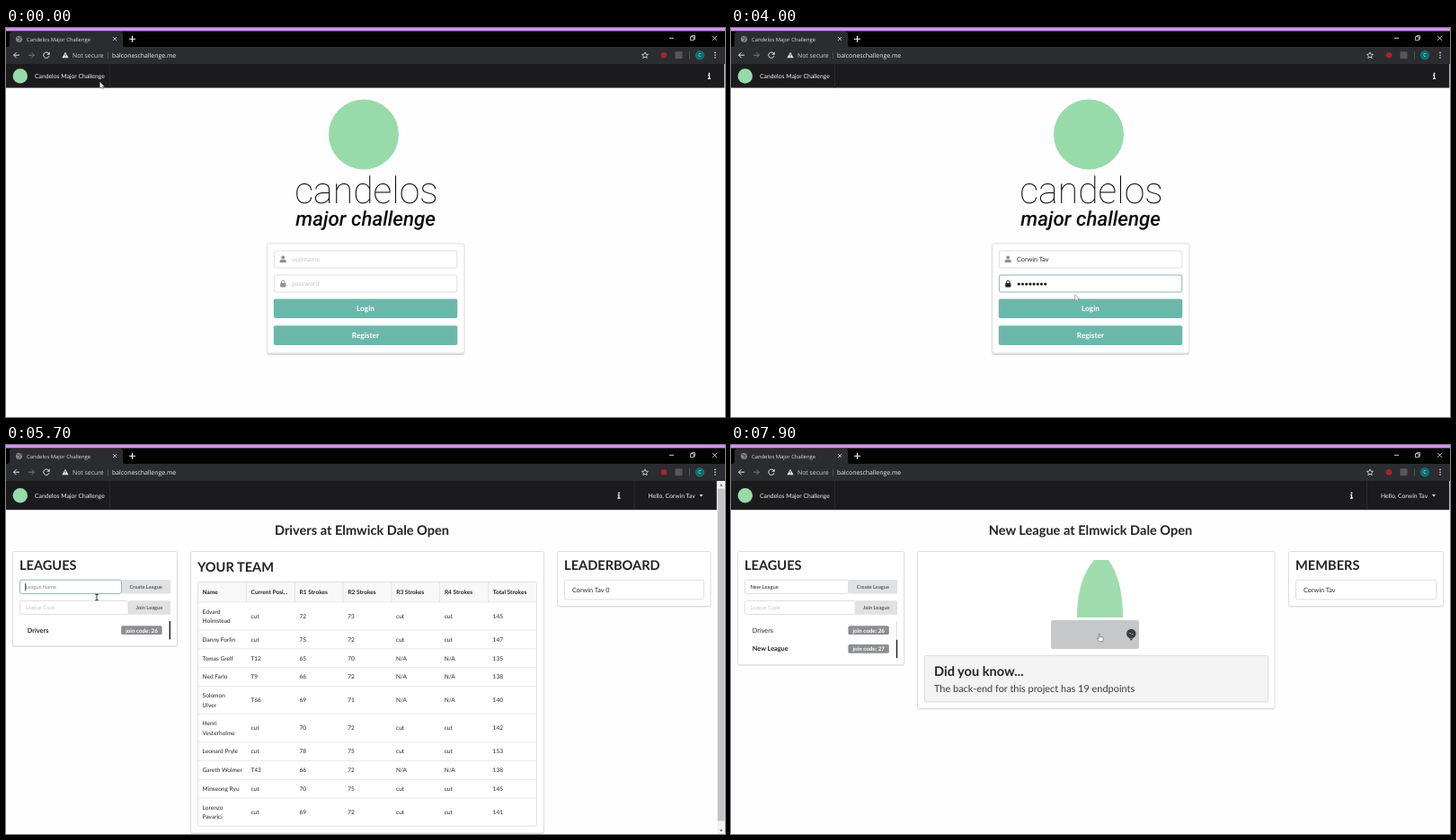
These frames come from a looping animation (800 by 433 pixels, 8000 ms). An HTML page:

```html
<!DOCTYPE html>
<html lang="en">
<head>
<meta charset="utf-8">
<title>Candelos Major Challenge</title>
<style>
  html, body { margin: 0; width: 100%; height: 100%; overflow: hidden; background: #fefdff; }
  svg { display: block; width: 800px; height: 433px; }
  text { font-family: Lato, sans-serif; white-space: pre; text-rendering: geometricPrecision; }
  .ui text { font-family: "Open Sans", "Noto Sans", sans-serif; }
  text.logo { font-family: Roboto, sans-serif; }
</style>
</head>
<body>
<svg id="stage" viewBox="0 0 800 433" xmlns="http://www.w3.org/2000/svg"></svg>
<script>
const LOOP = 8000, STEP = 100;
const APP = 'Candelos Major Challenge', USER = 'Corwin Tav';
const TEAM = 'Drivers', EVENT = 'Elmwick Dale Open', LEAGUE = 'New League';
const INK = '#222324', LINE = '#d9dadc', FOCUS = '#82acb1', TEAL = '#6bb8aa', GREEN = '#97dbaa', HINT = '#c6c6c9';

// Drawing helpers
const text = (x, y, s, size = 7.29, o = {}) =>
  `<text x="${x}" y="${y}" font-size="${size}" fill="${o.fill || INK}" font-weight="${o.bold ? 700 : o.weight || 400}"` +
  ` text-anchor="${o.mid ? 'middle' : 'start'}" ${o.more || ''}>${s}</text>`;
const rect = (x, y, w, h, fill, r = 0, more = '') =>
  `<rect x="${x}" y="${y}" width="${w}" height="${h}" rx="${r}" fill="${fill}" ${more}/>`;
const box = (x, y, w, h, more = '', fill = '#fff') => rect(x, y, w, h, fill, 2, `stroke="${LINE}" stroke-width=".9" ${more}`);
const path = (d, stroke, w = 1, fill = 'none') =>
  `<path d="${d}" fill="${fill}" stroke="${stroke}" stroke-width="${w}"/>`;
const dot = (x, y, r, fill) => `<circle cx="${x}" cy="${y}" r="${r}" fill="${fill}"/>`;
const group = (id, s, more = '') => `<g id="${id}" ${more}>${s}</g>`;
const card = (x, y, w, h) => rect(x, y + 1, w, h, '#e3e3e6', 2) + box(x, y, w, h);

function browser() {
  const lit = '#e4e5e7', dim = '#77797c';
  return group('browser',
    rect(0, 0, 800, 40, '#020203') + rect(0, 0, 800, 3.4, '#d294e9') +
    rect(0, 21, 800, 19, '#2b2c2f') +
    `<path d="M2 21Q4 21 4 18V7Q4 4 7 4H127Q130 4 130 7V18Q130 21 132 21Z" fill="#2b2c2f"/>` +
    dot(14.5, 12.3, 3.6, '#85878a') + path('M12 10.5l3 1 .5 2-2 2M15.5 9l2 3', '#3c3e41', .9) +
    text(23, 14.5, APP, 5.85, { fill: '#dfe0e2' }) +
    path('M119 10l4 4m0-4l-4 4', '#d5d6d8', .8) +
    path('M137 12.2h7M140.5 8.7v7', '#fff', 1.1) +
    path('M738 11.3h5M786 8.8l5 5m0-5l-5 5', '#fff', .8) +
    path('M761.5 9.8h3.8v3.8h-3.8zM762.8 9.8V8.6h3.8v3.8h-1.3', '#fff', .7) +
    path('M15 30.2H8.6M11.5 27.2l-3 3 3 3', lit) +
    path('M25 30.2h6.4M28.4 27.2l3 3-3 3', dim) +
    path('M47.6 28.4A3.2 3.2 0 1 0 48 31.2', lit) + `<path d="M48.6 26.6v3.2h-3.2z" fill="${lit}"/>` +
    `<path d="M66 26.8l3.6 6.4h-7.2z" fill="${lit}"/>` + path('M66 29v2m0 .6v.8', '#2b2c2f', .8) +
    text(74, 32.6, 'Not secure', 6.88, { fill: '#d0d2d4' }) +
    path('M113.5 26.5v8M760.5 26v9', '#55575a', .8) +
    text(118, 32.6, 'balconeschallenge.me', 6.88, { fill: '#f0f0f1' }) +
    path('M711 26.9l1 2.3 2.5.2-1.9 1.7.6 2.4-2.2-1.3-2.2 1.3.6-2.4-1.9-1.7 2.5-.2z', lit, .8) +
    dot(732, 30.2, 3.3, '#a5252b') + rect(744.5, 26.3, 8, 8, '#55575a', 1) +
    dot(772, 30.3, 5.2, '#0d6f70') + text(772, 32.4, USER[0], 5.6, { fill: '#d5ecea', mid: 1 }) +
    [27.4, 30.2, 33].map(y => dot(789, y, .8, lit)).join(''), 'class="ui"');
}

// Page header; end is the right edge of the page area
function nav(h, end, signed) {
  const c = 40 + h / 2, info = signed ? end - 109.5 : 782.5;
  let s = rect(0, 40, end - .7, h, '#1b1b1e') + dot(15.8, c + .2, 8.2, GREEN) +
    text(32, c + 2.5, APP, 6.8, { fill: '#f1f1f2' }) + path(`M115.5 40v${h}`, '#2e2e31', .8) +
    dot(info, c - 2.6, 1, '#fff') + path(`M${info - 1.3} ${c - .6}h1.3v3.6m-1.6 0h3.2`, '#fff', 1.2);
  if (signed) s += path(`M${end - 92.5} 40v${h}`, '#323235', .8) +
    text(end - 77, c + 2.5, 'Hello, ' + USER, 6.8, { fill: '#f1f1f2' }) +
    `<path d="M${end - 20} ${c - .8}h4l-2 2.2z" fill="#fff"/>`;
  return s;
}

function login() {
  const button = (y, s, id) => rect(297.8, y, 204.5, 21.6, TEAL, 2, `id="${id}"`) +
    text(400, y + 13.8, s, 8.33, { fill: '#fff', bold: 1, mid: 1 });
  const dots = [...Array(8)].map((_, i) => dot(320.3 + 4.2 * i, 285, 1.6, '#1c1c1c')).join('');
  return nav(26.6, 800) + dot(398, 118.5, 39, GREEN) +
    text(401, 195.2, 'candelos', 41, { weight: 200, mid: 1, fill: '#0c0c0e', more: 'class="logo"' }) +
    text(400.2, 219.8, 'major challenge', 22.4, { weight: 500, mid: 1, fill: '#0c0c0e', more: 'class="logo" font-style="italic"' }) +
    rect(290.5, 242, 219.5, 122, '#d2d8da', 2) + box(290.5, 240, 219.5, 122) +
    path('M291 362.2h219', '#e8e8ea', .8) +
    box(298.4, 248, 203.4, 19, 'id="userBox"') + box(298.4, 275, 203.4, 19, 'id="passBox"') +
    group('userIcon', dot(308.2, 255.3, 1.9, INK) + `<path d="M304.6 261v-1.2q0-2 2-2h3.2q2 0 2 2v1.2z" fill="${INK}"/>`) +
    group('passIcon', rect(305.2, 284, 6.2, 4.4, INK, .7) + path('M306.5 284.3v-1.4a1.8 1.8 0 0 1 3.6 0v1.4', INK)) +
    text(318, 260.4, '', 7.29, { more: 'id="userText"' }) +
    text(318, 287.4, 'password', 7.29, { fill: HINT, more: 'id="passHint"' }) + group('dots', dots) +
    button(301.5, 'Login', 'loginBtn') + button(331.3, 'Register', 'registerBtn');
}

const loader = () => nav(32.2, 800, true) +
  `<circle cx="400" cy="237" r="7.6" fill="none" stroke="#e2e2e4" stroke-width="1.1"/>` +
  `<path id="arc" d="M394.6 231.6A7.6 7.6 0 0 1 405.4 231.6" fill="none" stroke="#6d6d70" stroke-width="1.2"/>`;

// Left column; grow widens it when there is no scrollbar
function leagues(grow, items, nameId) {
  const split = 128.5 + grow, edge = 183 + grow, join = 136 + grow;
  const label = { bold: 1, mid: 1, fill: '#5c5d60' };
  let s = card(7.5, 118.5, 183 + grow, 84.8 + 20.7 * items.length) + text(15, 138.6, 'LEAGUES', 14.58, { bold: 1 }) +
    rect(split, 150, edge - split, 15.6, '#e0e1e2', 1.5, `id="${nameId}Btn"`) +
    text((split + edge) / 2, 159.8, 'Create League', 5.73, { ...label, more: `id="${nameId}Label"` }) +
    box(15.4, 150.2, split - 15.4, 15.2, `id="${nameId}Box"`) +
    text(21.5, 159.8, LEAGUE, 5.8, { more: `id="${nameId}Text"` }) +
    rect(join, 173.2, edge - join, 15.6, '#e0e1e2', 1.5) + text((join + edge) / 2, 183, 'Join League', 5.73, label) +
    box(15.4, 173.4, join - 15.4, 15.2) + text(21.5, 183, 'League Code', 5.9, { fill: HINT });
  items.forEach((name, i) => {
    const y = 196 + 20.8 * i, on = i === items.length - 1;
    s += text(23.8, y + 12.6, name, 7.29, { bold: on }) + rect(128.2 + grow, y + 5.2, 45.4, 9.8, '#8d8e91', 1.5) +
      text(151 + grow, y + 12.5, 'join code: ' + (26 + i), 6.25, { bold: 1, mid: 1, fill: '#fff' }) +
      rect(181.6 + grow, y, on ? 1.4 : .8, 20.4, on ? '#1b1c1d' : '#d0d1d3');
  });
  return s;
}

const people = (x, w, title, s) => card(x, 118.5, w, 61) + text(x + 7.6, 138.6, title, 14.58, { bold: 1 }) +
  box(x + 8, 150.3, w - 15.6, 21.6) + text(x + 16.5, 163.8, s, 7.29);

function table() {
  const cols = [213.4, 267.4, 321.4, 375.2, 429, 482.7, 536.6];
  const heads = ['Name', 'Current Posi...', 'R1 Strokes', 'R2 Strokes', 'R3 Strokes', 'R4 Strokes', 'Total Strokes'];
  const rows = [
    ['Edvard|Holmstead', 'cut', 72, 73], ['Danny Forlin', 'cut', 75, 72], ['Tomas Grelf', 'T12', 65, 70],
    ['Ned Farlo', 'T9', 66, 72], ['Solomon|Ulver', 'T66', 69, 71], ['Henri|Vesterholme', 'cut', 70, 72],
    ['Leonard Pryle', 'cut', 78, 75], ['Gareth Wolmer', 'T43', 66, 72], ['Minseong Ryu', 'cut', 70, 75],
    ['Lorenzo|Pavarici', 'cut', 69, 72]];
  let y = 175, s = box(213.4, 152.4, 377, 271.8) + rect(213.9, 152.9, 376, 22, '#f8f8fa', 1.5);
  heads.forEach((h, i) => {
    s += text(cols[i] + 5.2, 165.7, h, 6.56, { bold: 1 });
    if (i) s += path(`M${cols[i]} 153v22`, '#dedfe1', .8);
  });
  for (const [name, pos, r1, r2] of rows) {
    const lines = name.split('|'), h = lines.length > 1 ? 31.1 : 20.8, base = y + h / 2 + 2.3;
    const rest = pos === 'cut' ? 'cut' : 'N/A';
    s += path(`M213.8 ${y}h376`, '#e4e4e7', .8);
    lines.forEach((l, i) => s += text(218.6, base + (i - (lines.length - 1) / 2) * 10.3, l, 6.56));
    [pos, r1, r2, rest, rest, r1 + r2].forEach((v, i) => s += text(cols[i + 1] + 5, base, v, 6.56));
    y += h;
  }
  return s;
}

const dash = () => nav(32.2, 791.5, true) +
  text(396, 99.6, `${TEAM} at ${EVENT}`, 14.58, { bold: 1, mid: 1 }) +
  leagues(0, [TEAM], 'name') +
  card(205.5, 118.5, 393, 313.6) + text(213, 140.6, 'YOUR TEAM', 14.58, { bold: 1 }) + table() +
  people(613.5, 170.5, 'LEADERBOARD', USER + ' 0') +
  rect(791.5, 40, 8.5, 393, '#f1f1f2') + rect(791.8, 48.5, 7.8, 370, '#c3c3c5') +
  '<path d="M794 45.5h3.6l-1.8-2zM794 428.2h3.6l-1.8 2z" fill="#555"/>';

const draft = () => nav(32.2, 800, true) +
  text(400, 99.6, `${LEAGUE} at ${EVENT}`, 14.58, { bold: 1, mid: 1 }) +
  leagues(2.2, [TEAM, LEAGUE], 'made') +
  card(207.5, 118.5, 397.5, 175) +
  '<path d="M404 128H420Q436 150 436 192H385Q385 150 404 128Z" fill="#9fdcae"/>' +
  rect(356, 195, 98, 32, '#e0e1e2', 2, 'id="draftBtn"') +
  dot(445.3, 210, 5.3, '#3c3e41') + path('M443.3 209.5h1.5m1 1h1.6', '#a9c4b4', .9) +
  '<path d="M443.3 215.6h4l-2 2.2z" fill="#3c3e41"/>' +
  box(215.4, 234.5, 382.2, 51.4, '', '#f3f3f4') +
  text(226, 256.6, 'Did you know...', 14.58, { bold: 1 }) +
  text(226, 275.2, 'The back-end for this project has 19 endpoints', 10.94, { fill: '#3b3c3e' }) +
  people(620.5, 172, 'MEMBERS', USER);

const cursors =
  group('arrow', path('M0 0V7.1L1.6 5.7 2.7 8 3.8 7.5 2.7 5.2H4.9Z', '#77777a', .6, '#fff')) +
  group('beam', path('M-1.8-3.2H1.8M0-3.2V3.2M-1.8 3.2H1.8', '#1d1d1f', .9)) +
  group('hand', path('M-.7 0Q0-.8.6 0V3L3.6 3.7Q4.5 4 4.3 5.2L3.6 8.2H-.4L-2.8 4.8Q-2.6 3.8-.7 5.2Z', '#59595c', .6, '#fff'));

const scenes = { login, loader, dash, draft };
document.getElementById('stage').innerHTML = rect(0, 0, 800, 433, '#fefdff') +
  Object.keys(scenes).map(k => group(k, scenes[k]())).join('') + browser() +
  rect(0, 0, .9, 8.4, '#222', 0, 'id="caret"') + group('pointer', cursors);

const $ = id => document.getElementById(id);
const show = (id, on) => $(id).setAttribute('display', on ? 'inline' : 'none');
const set = (id, k, v) => $(id).setAttribute(k, v);

// Timetables: [ms, value...]
const sceneAt = [[0, 'login'], [4200, 'loader'], [4600, 'dash'], [7400, 'draft']];
const shapeAt = [[0, 'arrow'], [1100, 'beam'], [4000, 'arrow'], [4100, 'hand'], [4200, 'arrow'],
  [5400, 'beam'], [6800, 'hand'], [7400, 'arrow'], [7800, 'hand']];
const track = [[0, 104.5, 60], [100, 394, 220], [600, 394, 220], [1300, 412.5, 263], [3700, 412.5, 263],
  [4000, 382.8, 296.8], [4100, 376, 305], [4300, 369, 310], [4900, 369, 310], [5500, 101, 169.5],
  [6400, 101, 169.5], [6900, 148.8, 164.5], [7500, 148.8, 164.5], [7900, 410, 210.5], [8000, 410, 210.5]];
const current = (list, t) => list.filter(k => k[0] <= t).pop()[1];

function pointerAt(t) {
  const i = track.findIndex(k => k[0] > t), a = track[i - 1], b = track[i];
  const p = (t - a[0]) / (b[0] - a[0]), e = p * p * (3 - 2 * p);
  return [a[1] + (b[1] - a[1]) * e, a[2] + (b[2] - a[2]) * e];
}

const typed = (t, start, pace, max) => Math.max(0, Math.min(max, Math.floor((t - start) / pace)));

function field(id, value, hint, focused) {
  const el = $(id + 'Text');
  el.textContent = value || hint;
  el.setAttribute('fill', value ? INK : focused ? '#88888b' : HINT);
  set(id + 'Box', 'stroke', focused ? FOCUS : LINE);
  return value ? el.getComputedTextLength() : 0;
}

function render(t) {
  const scene = current(sceneAt, t), shape = current(shapeAt, t);
  for (const k in scenes) show(k, k === scene);
  for (const k of ['arrow', 'beam', 'hand']) show(k, k === shape);
  set('pointer', 'transform', `translate(${pointerAt(t)})`);
  let caret = null;
  if (scene === 'login') {
    const onUser = t >= 1500 && t < 3100, onPass = t >= 3100, n = typed(t, 3150, 75, 8);
    const w = field('user', USER.slice(0, typed(t, 2000, 95, 10)), 'username', onUser);
    set('userIcon', 'opacity', onUser ? 1 : .5);
    set('passIcon', 'opacity', onPass ? 1 : .5);
    set('passBox', 'stroke', onPass ? FOCUS : LINE);
    set('passHint', 'fill', onPass ? '#88888b' : HINT);
    show('passHint', !n);
    [...$('dots').children].forEach((d, i) => d.setAttribute('display', i < n ? 'inline' : 'none'));
    set('loginBtn', 'fill', t >= 4100 ? '#58a698' : TEAL);
    if (onUser) caret = [318 + w, 253.4, 1500];
    if (onPass) caret = [318 + 4.2 * n, 280.4, 3100];
  } else if (scene === 'loader') {
    set('arc', 'transform', `rotate(${25 + (t - 4300) * .6} 400 237)`);
  } else if (scene === 'dash') {
    const on = t >= 5500 && t < 7000, hover = t >= 6800;
    const w = field('name', LEAGUE.slice(0, typed(t, 5700, 60, 10)), 'League Name', on);
    set('nameBtn', 'fill', hover ? '#c8c9cb' : '#e0e1e2');
    set('nameLabel', 'fill', hover ? '#2c2d2f' : '#5c5d60');
    if (on) caret = [21.3 + w, 154, 5500];
  } else {
    set('draftBtn', 'fill', t >= 7800 ? '#c6c7c9' : '#e0e1e2');
  }
  show('caret', caret && (t - caret[2]) % 1000 < 500);
  if (caret) {
    set('caret', 'x', caret[0]);
    set('caret', 'y', caret[1]);
  }
}

const begin = performance.now();
function tick() {
  const t = (performance.now() - begin) % LOOP;
  render(Math.floor(t / STEP) * STEP);
  requestAnimationFrame(tick);
}
tick();
</script>
</body>
</html>
```
